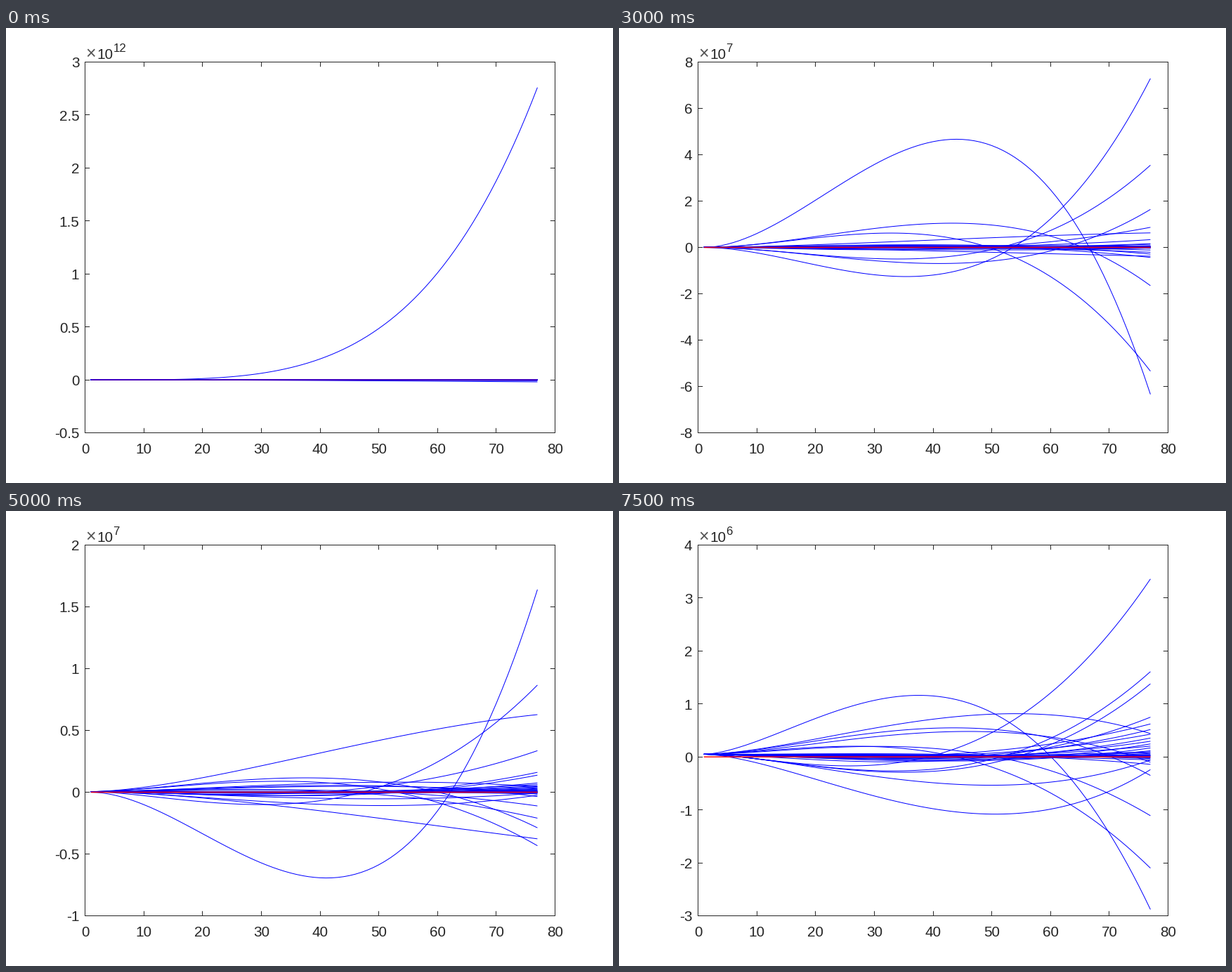
Recreate the animation shown at these times as a matplotlib script. Size 864 by 648 pixels, loop 8000 ms.

```python
import math
import numpy as np
import matplotlib.pyplot as plt
from matplotlib.animation import FuncAnimation

W, H = 864, 648
LEFT, RIGHT, TOP, BOTTOM = 112.5, 781.5, 48.5, 576.5
STEPS = 16
INK = "#262626"
SIZE = 20.8
plt.rcParams["font.family"] = "Liberation Sans"

x = np.arange(1, 78)
t = (x - 1) / 76

# (end value in millions, x of the zero crossing), in order of dropping out
BENDS = [
    (-19500, 400), (-8500, 400), (850, 400), (339, 420), (139, 39),
    (72.9, 53.6), (-63.4, 66.6), (-53.4, 49.5), (35.5, 51.5), (-16.5, 65.5),
    (16.4, 62.2), (6.28, 150), (8.67, 47.3), (-3.77, 248), (-4.33, 52.9),
    (-2.88, 60), (-2.1, 43), (-1.11, 50), (3.36, 40), (1.61, 52),
    (1.38, 54.5), (-.24, 80.2), (.44, 87), (-.35, 70.2), (-.1, 74.4),
    (-.06, 78.5),
]


def bend(end, zero):
    """Curve from near 0 to end that crosses the axis at x = zero."""
    root = (zero - 1) / 76
    large = abs(end) > 10
    y = end * t ** (1.9 if large else 1.65) * (t - root) / (1 - root)
    return 1e6 * (y if large else y + .05 * (1 - t))


def build_curves():
    rng = np.random.default_rng(4)
    curves = [2.76e12 * (x / 77) ** 4.03]
    curves += [bend(*b) for b in BENDS]
    for k in range(24):
        end = .75 * .83 ** k * rng.choice([-1, 1], p=[.35, .65])
        curves.append(bend(end, rng.uniform(35, 66)))
    return curves


CURVES = build_curves()

fig = plt.figure(figsize=(W / 72, H / 72), dpi=72, facecolor="white")
ax = fig.add_axes([0, 0, 1, 1])


def choose_scale(low, high):
    """Tightest round limits with at most ten tick intervals."""
    decade = 10.0 ** math.floor(math.log10(high - low))
    options = []
    for step in np.array([.1, .2, .5, 1, 2, 5]) * decade:
        a, b = math.floor(low / step), math.ceil(high / step)
        if b - a <= 10:
            options.append((round((b - a) * step / decade, 6), step, a, b))
    _, step, a, b = min(options)
    power = math.floor(math.log10(max(high, step)) + 1e-9)
    return step, a, b, power


def px(v):
    return LEFT + (RIGHT - LEFT) * v / 80


def line(xs, ys, color=INK, width=1.0, **kw):
    ax.plot(xs, ys, color=color, lw=width, snap=False,
            solid_capstyle="butt", **kw)


def label(tx, ty, text, ha="left", size=SIZE, color=INK):
    ax.text(tx, ty, text, ha=ha, va="baseline", fontsize=size, color=color)


def draw_axes(py, step, a, b, power):
    line([LEFT, RIGHT, RIGHT, LEFT, LEFT], [TOP, TOP, BOTTOM, BOTTOM, TOP])
    for v in range(0, 81, 10):
        tick = [math.floor(px(v)) + .5] * 2
        line(tick, [BOTTOM, BOTTOM - 6.7])
        line(tick, [TOP, TOP + 6.7])
        label(px(v), 606, str(v), "center")
    for n in range(a, b + 1):
        y = py(n * step)
        tick = [math.floor(y) + .5] * 2
        line([LEFT, LEFT + 6.7], tick)
        line([RIGHT, RIGHT - 6.7], tick)
        label(104.5, y + 8, f"{n * step / 10.0 ** power:g}", "right")
    label(121, 44, "\u00d7", "center", 25, "#555555")
    label(129, 43.5, "10")
    label(152.5, 34, str(power), size=16.7)


def draw(i):
    shown = CURVES[round(1.08 * i):]
    step, a, b, power = choose_scale(np.min(shown), np.max(shown))

    def py(v):
        return BOTTOM - (BOTTOM - TOP) * (v / step - a) / (b - a)

    ax.clear()
    ax.set_axis_off()
    ax.set(xlim=(0, W), ylim=(H, 0))
    for values in shown:
        line(px(x), py(values), "#0000ff")
    early = i < 5
    line(px(x), py(0 * x), "#ff0000", 1 if early else 1.6,
         alpha=.5 if early else .9)
    draw_axes(py, step, a, b, power)
    return []


anim = FuncAnimation(fig, draw, frames=STEPS, init_func=lambda: [],
                     interval=500, repeat=True, repeat_delay=0)
plt.show()
```
